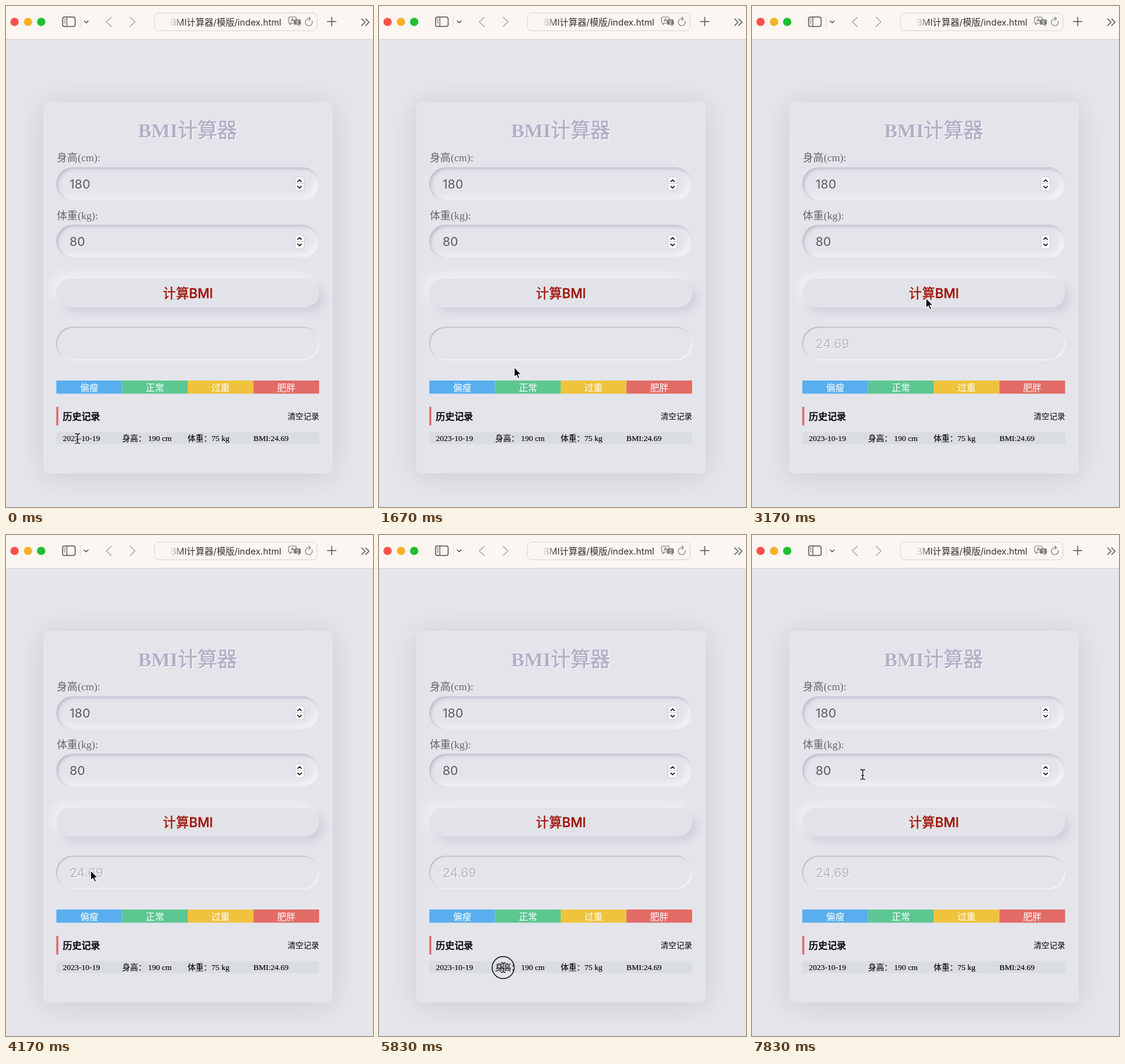
These frames come from a looping animation (600x820 px, 8 s). An HTML page:

```html
<!DOCTYPE html>
<html lang="zh-CN">
<head>
<meta charset="utf-8">
<title>BMI</title>
<style>
html, body { margin: 0; width: 100%; height: 100%; overflow: hidden; background: #e4e6ec; }
#stage { position: absolute; left: 0; top: 0; width: 600px; height: 820px; overflow: hidden; }
#stage > * { position: absolute; box-sizing: border-box; }
.bar { left: 0; top: 0; width: 600px; height: 55px; background: #fbf6f1; border-bottom: 1px solid #d6d2cf; }
.address { left: 242px; top: 11px; width: 267px; height: 30px; border: 1px solid #d9d5d1; border-radius: 8px; }
.card { left: 61px; top: 157px; width: 473px; height: 608px; border-radius: 8px; background: #e4e5eb; box-shadow: 0 4px 48px rgba(0,0,0,.12); }
.field, .button, .result { left: 82px; width: 430px; height: 55px; border-radius: 28px; }
.field { box-shadow: inset 2px 2px 6px #b1b2c4, inset -5px -5px 11px #f7f7f9; }
.button { top: 446px; height: 47px; background: #e2e3e8; box-shadow: -8px -8px 16px #eeeff3, 8px 8px 14px #cfcfda; }
.result { top: 525px; box-shadow: inset 1px 1px 2px #aaaab4, inset -1px -1px 2px #fff; }
.spinner { left: 472px; width: 16px; height: 24px; border-radius: 6px; border: 1px solid #c9c9ce; background: linear-gradient(#fff 10.5px, #ccc 10.5px 11.5px, #fff 11.5px); }
svg { left: 0; top: 0; font-family: "Liberation Serif", "Noto Sans CJK SC", serif; }
text { white-space: pre; }
.ui { font-family: Inter, "Noto Sans CJK SC", sans-serif; }
.number { font-size: 20px; font-weight: 500; }
.lit { filter: drop-shadow(1px 1px 0 #fff); }
.line { fill: none; stroke: #555; stroke-width: 1.5; stroke-linecap: round; stroke-linejoin: round; }
</style>
</head>
<body>
<div id="stage">
  <div class="bar"></div>
  <div class="address"></div>
  <div class="card"></div>
  <div class="field" style="top:264px"></div>
  <div class="field" style="top:358px"></div>
  <div class="spinner" style="top:279px"></div>
  <div class="spinner" style="top:373.5px"></div>
  <div class="button"></div>
  <div class="result"></div>
  <svg width="600" height="820" viewBox="0 0 600 820">
    <defs>
      <linearGradient id="fade" gradientUnits="userSpaceOnUse" x1="268" x2="290" y1="0" y2="0">
        <stop stop-color="#333" stop-opacity="0"/><stop offset="1" stop-color="#333"/>
      </linearGradient>
      <path id="beamShape" d="M-3.5 -8Q0 -8 0 -5.5V5.5Q0 8 -3.5 8M3.5 -8Q0 -8 0 -5.5V5.5Q0 8 3.5 8M-1.5 1.5H1.5"/>
    </defs>

    <circle cx="14" cy="26" r="6.8" fill="#fb514b"/>
    <circle cx="36" cy="26" r="6.8" fill="#f8b02a"/>
    <circle cx="57.5" cy="26" r="6.8" fill="#1fbf2e"/>
    <g class="line">
      <rect x="92.5" y="18" width="20.5" height="15.5" rx="3"/>
      <path d="M99.5 18V33.5M95 21.5H97M95 24.5H97M95 27.5H97" stroke-width="1.2"/>
      <path d="M121.5 17V35" style="stroke:#dedad6;stroke-width:1"/>
      <path d="M128 24.5L131.2 27.5L134.4 24.5"/>
      <path d="M172 18.5L164 26L172 33.5M203 18.5L211 26L203 33.5" style="stroke:#aaa6a3"/>
      <path d="M525.5 25.5H539.5M532.5 18.5V32.5"/>
      <path d="M581.5 21L587 26.5L581.5 32M588 21L593.5 26.5L588 32"/>
      <g style="stroke:#777;stroke-width:1.1">
        <path d="M500.4 24.5A5.7 5.7 0 1 1 495 20.8H497M495 18L497.8 20.8L495 23.6"/>
        <path d="M464.5 18H472.5Q474.5 18 474.5 20V26Q474.5 28 472.5 28H467L464 30.5V28Q462 28 462 26V20Q462 18 464.5 18Z"/>
        <path d="M466 25.5L468.3 20.5L470.6 25.5M467 23.8H469.7"/>
      </g>
    </g>
    <path d="M473 22H480Q482 22 482 24V29Q482 31 480 31V33.5L477.5 31H473Q471 31 471 29V24Q471 22 473 22Z" fill="#777"/>
    <text x="476.5" y="29.5" class="ui" font-size="7.5" fill="#fff" text-anchor="middle">文</text>
    <text x="450" y="31.5" class="ui" font-size="14.6" fill="url(#fade)" text-anchor="end">BMI计算器/模版/index.html</text>

    <text x="297" y="215" class="lit" font-size="32.4" font-weight="700" fill="#b0b0c6" text-anchor="middle">BMI<tspan font-weight="400" stroke="#b0b0c6" stroke-width=".7">计算器</tspan></text>
    <g font-size="17.1" fill="#666">
      <text x="83" y="254">身高(cm):</text>
      <text x="83" y="348.5">体重(kg):</text>
    </g>
    <g class="ui lit number" fill="#666">
      <text x="104" y="298.5">180</text>
      <text x="104" y="392.5">80</text>
    </g>
    <g class="line" style="stroke:#111;stroke-width:1.7">
      <path id="arrows" d="M477 287.5L480 284.7L483 287.5M477 295.2L480 298L483 295.2"/>
      <use href="#arrows" y="94.5"/>
    </g>
    <text x="297.5" y="477.5" class="ui" font-size="21.3" font-weight="500" fill="#a01208" stroke="#a01208" stroke-width=".3" text-anchor="middle">计算BMI</text>
    <text id="bmi" x="104" y="560" class="ui lit number" fill="#bdbdc0">24.69</text>

    <g id="levels"></g>
    <g id="levelSelection"></g>
    <g id="levelNames" font-size="15" fill="#fff" text-anchor="middle"></g>

    <rect x="82.3" y="656" width="3.2" height="30.5" fill="#d9686a"/>
    <text x="93" y="676.5" font-size="15.2" stroke="#000" stroke-width=".6">历史记录</text>
    <text x="512" y="676" font-size="12.9" text-anchor="end">清空记录</text>
    <rect x="82.3" y="697.5" width="429.7" height="19.5" fill="#d9dce0"/>
    <g id="rowSelection"></g>
    <g font-size="13" stroke="#000" stroke-width=".15">
      <text x="93" y="711.5">2023-10-19</text>
      <text x="190" y="711.5">身高： 190 cm</text>
      <text x="297" y="711.5">体重：75 kg</text>
      <text x="404.5" y="711.5">BMI:24.69</text>
    </g>

    <g id="cursor">
      <circle id="ring" r="18" fill="none" stroke="#111" stroke-width="1.5"/>
      <path id="arrow" d="M-.5 0V16.3L3.2 12.9L5.8 18.8L8.4 17.7L5.9 11.9H11Z" fill="#000" stroke="#fff" stroke-width="1.2" stroke-linejoin="round"/>
      <g id="beam" fill="none" stroke-linecap="round">
        <use href="#beamShape" stroke="#fff" stroke-width="3" stroke-opacity=".7"/>
        <use href="#beamShape" stroke="#111" stroke-width="1.3"/>
      </g>
    </g>
  </svg>
</div>
<script>
const LOOP = 8000, STEPS_PER_MS = 6 / 1000;
const $ = id => document.getElementById(id);
const rect = (x, y, w, h, fill) =>
  `<rect x="${x}" y="${y}" width="${Math.max(0, w)}" height="${h}" fill="${fill}"/>`;
const show = (id, on) => $(id).setAttribute('visibility', on ? 'visible' : 'hidden');
const within = (n, ranges) => ranges.some(([a, b]) => n >= a && n <= b);

// Pointer path: step, x, y
const path = [
  [0, 117, 708], [1, 125, 708], [3, 270, 710], [4, 366, 716], [5, 350, 695],
  [7, 213, 628], [9, 215, 600], [14, 248, 556], [17, 290, 475], [19, 285, 478],
  [25, 139, 549], [28, 229, 620], [31, 332, 618], [33, 280, 650], [35, 203, 708],
  [37, 300, 711], [39, 360, 731], [41, 350, 725], [43, 290, 610], [47, 181, 392]
];
const beamSteps = [[0, 4], [28, 31], [35, 37], [46, 47]];
const pressSteps = [[1, 4], [17, 17], [28, 31], [35, 38]];
const columns = [93, 190, 297, 404.5];

[['偏瘦', '#58aeee'], ['正常', '#5dc792'], ['过重', '#efc33d'], ['肥胖', '#e26b66']].forEach(([name, color], i) => {
  const x = 82.3 + i * 107.4;
  $('levels').innerHTML += rect(x, 613, 107.4, 21.5, color);
  $('levelNames').innerHTML += `<text x="${x + 53.7}" y="630">${name}</text>`;
});

function pointerAt(step) {
  const i = Math.max(1, path.findIndex(p => p[0] >= step));
  const [s0, x0, y0] = path[i - 1], [s1, x1, y1] = path[i];
  const k = (step - s0) / (s1 - s0);
  return [x0 + (x1 - x0) * k, y0 + (y1 - y0) * k];
}

function rowSelection(from, to) {
  const blue = '#9dc5f3';
  const start = columns.filter(c => c <= from).pop();
  const end = columns.filter(c => c <= to).pop();
  let out = rect(from, 699, to - from, 16.5, blue);
  if (end > start) {
    const next = columns[columns.indexOf(start) + 1];
    out += rect(start, 715, next - start, 2, blue);
    if (end === 297) out += rect(190, 715, 107, 2, blue) + rect(297, 697.5, 107.5, 2, blue);
  }
  return out;
}

function draw(now) {
  const step = Math.floor((now % LOOP + 4) * STEPS_PER_MS) % 48;
  const [x, y] = pointerAt(step);
  const beam = within(step, beamSteps);
  $('cursor').setAttribute('transform', `translate(${x} ${y})`);
  show('beam', beam);
  show('arrow', !beam);
  show('ring', within(step, pressSteps));
  show('bmi', step >= 18);

  let row = '';
  if (step >= 1 && step <= 8) row = rowSelection(119, step < 4 ? x : 366);
  if (step >= 36 && step <= 41) row = rowSelection(203, step < 39 ? x : 366);
  $('rowSelection').innerHTML = row;
  $('levelSelection').innerHTML = step >= 29 && step <= 32
    ? rect(229, 613, Math.min(x, 297) - 229, 21.5, '#6bb9d1') : '';
}

const begin = performance.now();
(function tick() {
  draw(performance.now() - begin);
  requestAnimationFrame(tick);
})();
</script>
</body>
</html>
```
